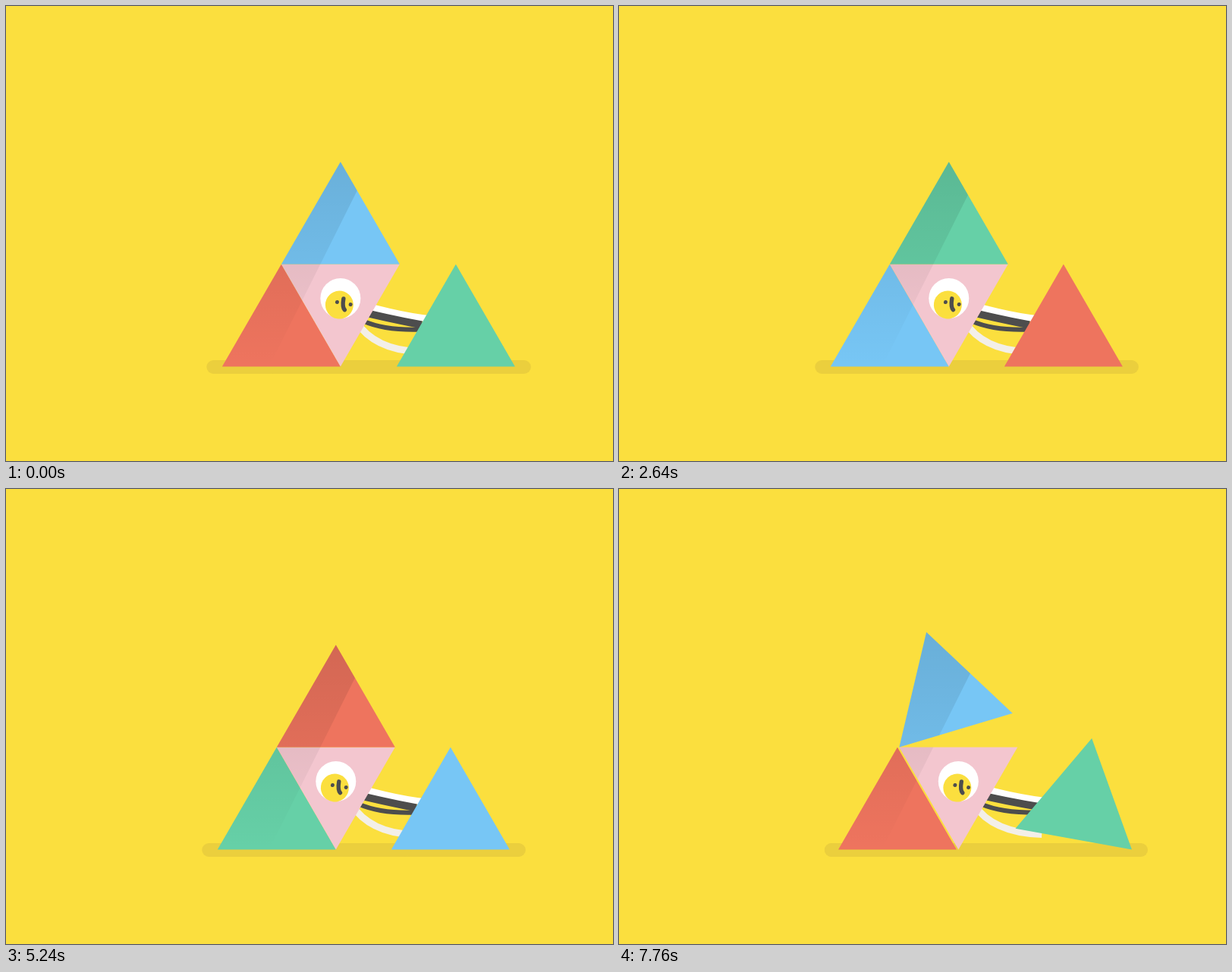
These frames come from a looping animation (800 px wide and 600 px high, 7.8 s). An HTML page with a canvas:

```html
<!DOCTYPE html>
<html lang="en">
<head>
<meta charset="utf-8">
<title>Rolling triangles</title>
<style>
  html, body { margin: 0; width: 100%; height: 100%; overflow: hidden; background: #fbdf3e; }
  canvas { display: block; }
</style>
</head>
<body>
<canvas width="800" height="600"></canvas>
<script>
const ctx = document.querySelector('canvas').getContext('2d');
const YELLOW = '#fbdf3e', DARK = '#4d4d4d', PINK = '#f3c6cf';
const COLORS = ['#ee745e', '#77c6f5', '#66d0a7'];
const STEP = 2600, LOOP = 3 * STEP, SCROLL = 395, GROUND = 475.5;
const S = 156, H = 135;

// The chain of three, measured from its lower right corner.
const LEFT = [[-2 * S, 0], [-S, 0], [-1.5 * S, -H]];
const MIDDLE = [[-S, 0], [-S / 2, -H], [-1.5 * S, -H]];
const RIGHT = [[-S, 0], [0, 0], [-S / 2, -H]];
const APEX = [-S / 2, -H];
const UPRIGHT = [[-S / 2, H / 3], [S / 2, H / 3], [0, -2 * H / 3]];
const TOP = [[-S, 0], [0, 0], [-S / 2, -H]];

const clamp = v => Math.max(0, Math.min(1, v));
const mix = (a, b, u) => a + (b - a) * u;
const add = ([x, y], dx, dy) => [x + dx, y + dy];
const right = pts => Math.max(...pts.map(p => p[0]));
const center = pts => [0, 1].map(i => (pts[0][i] + pts[1][i] + pts[2][i]) / 3);

function rot([x, y], deg) {
  const r = deg * Math.PI / 180, c = Math.cos(r), s = Math.sin(r);
  return [x * c - y * s, x * s + y * c];
}

// Smooth curve through [time, value] pairs that does not overshoot.
function track(...keys) {
  const n = keys.length - 1;
  const slope = i => (keys[i + 1][1] - keys[i][1]) / (keys[i + 1][0] - keys[i][0]);
  const tangent = i => {
    if (i === 0 || i === n) return 0;
    const a = slope(i - 1), b = slope(i);
    return a * b > 0 ? 2 * a * b / (a + b) : 0;
  };
  return t => {
    if (t <= keys[0][0]) return keys[0][1];
    if (t >= keys[n][0]) return keys[n][1];
    const i = keys.findIndex(k => k[0] > t) - 1;
    const [t0, v0] = keys[i], [t1, v1] = keys[i + 1];
    const d = t1 - t0, u = (t - t0) / d, w = 1 - u;
    return w * w * (1 + 2 * u) * v0 + u * u * (3 - 2 * u) * v1
      + d * u * w * (w * tangent(i) - u * tangent(i + 1));
  };
}

const swing = track([1485, 0], [1600, 2.5], [1740, 12], [1880, 33.7], [2000, 92],
  [2180, 120], [2300, 150], [2390, 195], [2480, 240]);
const topLag = track([2280, 0], [2390, 20], [2460, 37], [2560, 17], [2600, 0]);
const tailLead = track([2300, 0], [2480, 20], [2560, 10.4], [2600, 0]);
const tailRight = track([2300, 1000], [2400, 1041], [2460, 1057], [2530, 1065]);
const tumble = track([590, 180], [700, 232], [860, 269.5], [880, 268.7], [1010, 248], [1100, 240]);
const tumbleRight = track([590, 675], [700, 735], [880, 799], [1000, 825], [1100, 834]);
const faceTurn = track([1485, 0], [1600, 2.5], [1740, 12], [1880, 33.7], [2000, 92],
  [2180, 150], [2400, 300], [2500, 368], [2560, 370]);

// Pivots on the corner for 60 degrees, then over the tip of the next base.
function chain(pts, angle, x) {
  const [ax, ay] = rot(APEX, Math.min(angle, 60));
  return pts.map(p => add(rot(add(p, -APEX[0], -APEX[1]), angle), x + ax, ay));
}

function grounded(xRight, angle) {
  const pts = UPRIGHT.map(p => rot(p, angle));
  const dx = xRight - right(pts), dy = -Math.max(...pts.map(p => p[1]));
  return pts.map(p => add(p, dx, dy));
}

function falling(t) {
  if (t >= 590) return grounded(tumbleRight(t), tumble(t));
  const angle = 180 * clamp((t - 300) / 290) ** 2;
  return TOP.map(p => add(rot(p, angle), 519, -H));
}

function tail(t, angle, x) {
  const held = chain(LEFT, angle, x);
  const u = clamp((t - 2310) / 130), k = u * u * (3 - 2 * u);
  if (!k) return held;
  const free = grounded(tailRight(t), angle + tailLead(t));
  return held.map((p, i) => [mix(p[0], free[i][0], k), mix(p[1], free[i][1], k)]);
}

function fillTri(pts, color) {
  ctx.fillStyle = color;
  ctx.beginPath();
  pts.forEach(p => ctx.lineTo(...p));
  ctx.fill();
}

function disc(x, y, r, color) {
  ctx.fillStyle = color;
  ctx.beginPath();
  ctx.arc(x, y, r, 0, 2 * Math.PI);
  ctx.fill();
}

function shadow(x0, x1) {
  ctx.fillStyle = '#ebcf3d';
  ctx.beginPath();
  ctx.roundRect(x0, -8.5, x1 - x0, 18, 9);
  ctx.fill();
}

function limb(from, bend, to, color, width) {
  ctx.strokeStyle = color;
  ctx.lineWidth = width;
  ctx.beginPath();
  ctx.moveTo(...from);
  ctx.quadraticCurveTo(...bend, ...to);
  ctx.stroke();
}

function limbs(c, e) {
  limb(add(c, 20, 30), add(c, 45, 68), add(e, -50, 25), '#f3efe8', 9);
  limb(c, add(c, 70, 22), add(e, -35, -18), '#fff', 9);
  limb(add(c, 20, 16), add(c, 60, 26), add(e, -45, -10), DARK, 10);
  limb(add(c, 30, 30), add(c, 60, 43), add(e, -44, -4), DARK, 6);
}

function face([x, y], angle) {
  ctx.save();
  ctx.translate(x, y);
  disc(0, 0, 26.5, '#fff');
  ctx.rotate(angle * Math.PI / 180);
  ctx.translate(0, 8.7);
  disc(0, 0, 18.5, YELLOW);
  disc(-3.5, -3, 2.5, DARK);
  disc(14.5, -3, 2.5, DARK);
  ctx.strokeStyle = DARK;
  ctx.lineWidth = 5.4;
  ctx.lineCap = 'round';
  ctx.beginPath();
  ctx.moveTo(4, -9);
  ctx.bezierCurveTo(4, -3, 5, 3, 8, 5.3);
  ctx.stroke();
  ctx.restore();
}

function draw(time) {
  const cycle = Math.floor(time / STEP), t = time % STEP;
  const scroll = SCROLL * t / STEP;
  const pull = Math.max(0, (t - 1485) / 395) ** 2;
  const x = 597 + 83.5 * Math.min(1, pull);
  const angle = swing(t);
  const gap = 74 * (1 - clamp(t / 360) ** 2);

  const a = tail(t, angle, x);
  const mid = chain(MIDDLE, angle, x);
  const b = chain(RIGHT, angle - topLag(t), x).map(p => add(p, gap, 0));
  const c = falling(t);
  const heart = center(mid);

  ctx.fillStyle = YELLOW;
  ctx.fillRect(0, 0, 800, 600);
  ctx.save();
  ctx.translate(-scroll, GROUND);

  const edge = Math.min(660, 264.5 + 163 * pull);
  shadow(edge, Math.max(right(a), right(mid), right(b)) + 21);
  shadow(Math.max(edge, right(c) - 175), right(c) + 21);

  if (t < 360) limbs(heart, center(b));
  else if (t > 2330) limbs(heart, [center(a)[0], -H / 3]);
  else if (t > 1250 && t < 1960) {
    const tip = mix(x - 60, 756, clamp((t - 1250) / 200));
    ctx.fillStyle = DARK;
    ctx.fillRect(x - 60, -71.5, tip - x + 60, 12);
  }

  const tris = [a, mid, b, c];
  const color = i => COLORS[(cycle + i) % 3];
  [color(0), PINK, color(2), color(1)].forEach((col, i) => fillTri(tris[i], col));

  // Slanted shade that stays fixed on the stage.
  ctx.save();
  ctx.beginPath();
  ctx.moveTo(scroll - 50, -GROUND);
  ctx.lineTo(scroll + 584.5, -GROUND);
  ctx.lineTo(scroll + 346.5, 0.5);
  ctx.lineTo(scroll - 50, 0.5);
  ctx.clip();
  const shade = ctx.createLinearGradient(0, 70 - GROUND, 0, 0);
  shade.addColorStop(0, 'rgba(0,0,0,.17)');
  shade.addColorStop(1, 'rgba(0,0,0,0)');
  tris.forEach(tri => fillTri(tri, shade));
  ctx.restore();

  face(heart, faceTurn(t) + (t < 1485 ? 10 * (1 - clamp(t / 500)) : 0));
  ctx.restore();
}

const start = performance.now();
function tick() {
  draw((performance.now() - start) % LOOP);
  requestAnimationFrame(tick);
}
tick();
</script>
</body>
</html>
```
